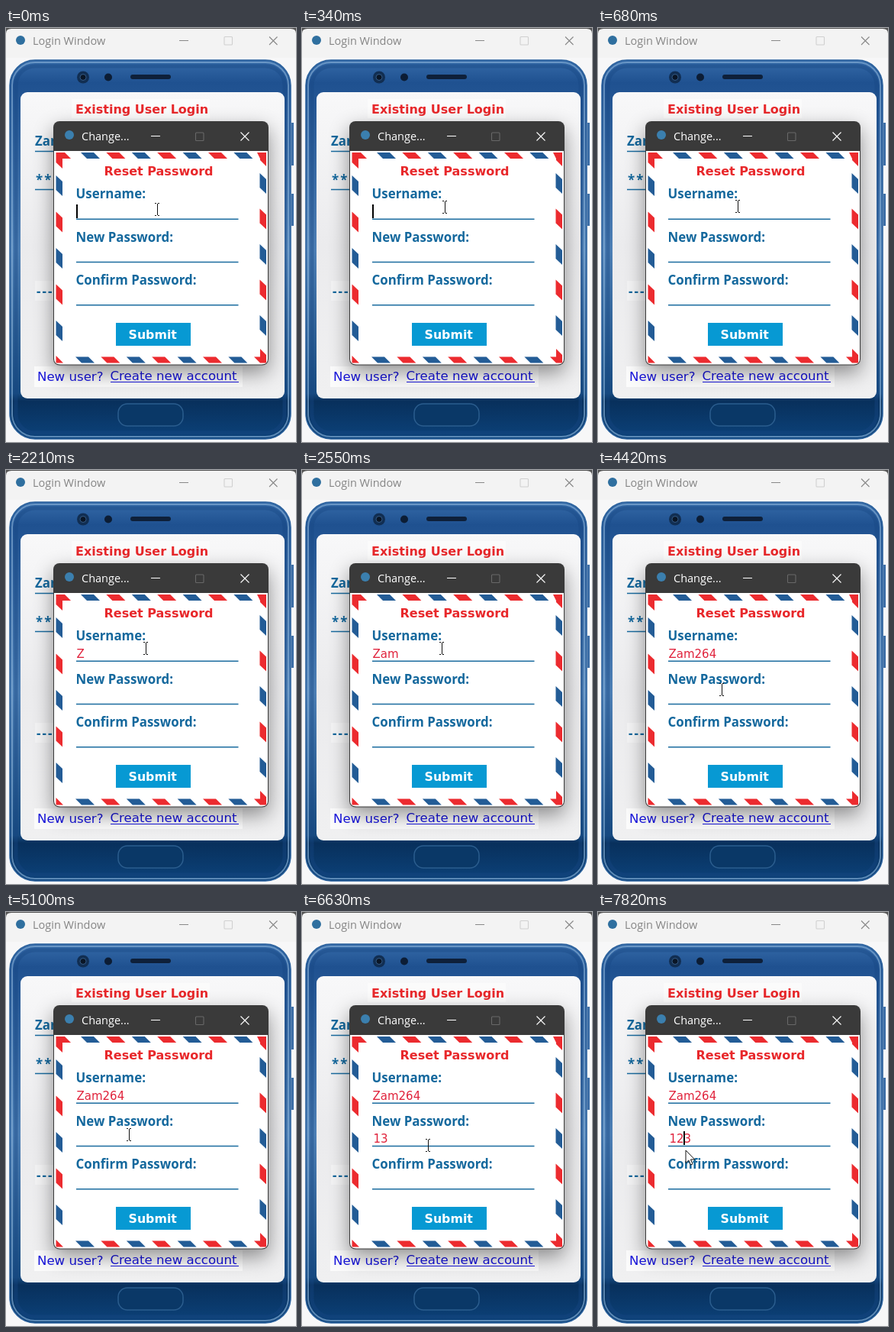
An HTML page that plays this animation: 380 px wide and 542 px high, repeating every 7990 ms.

```html
<!DOCTYPE html>
<html lang="en">
<head>
<meta charset="utf-8">
<title>Reset password form</title>
<style>
  html, body { margin: 0; width: 380px; height: 542px; overflow: hidden; background: #555; }
  svg { display: block; }
  text { white-space: pre; }
  .bar { font: 14.5px "Open Sans", "Noto Sans", sans-serif; }
  .head { font: bold 16px "DejaVu Sans", sans-serif; fill: #e8282b; }
  .label { font: bold 16.9px "Noto Sans", "Open Sans", sans-serif; fill: #14689d; }
  .masked { letter-spacing: 2px; }
  .entry { font: 15px "DejaVu Sans", sans-serif; fill: #e0233c; }
  .button { font: bold 15.8px "DejaVu Sans", sans-serif; fill: #fff; }
  .link { font: 16.6px "DejaVu Sans", sans-serif; fill: #1714dd; }
  .rule { stroke: #1b6c9f; stroke-width: 1.4; }
  .dialog { filter: drop-shadow(0 10px 13px rgba(0, 0, 0, .42)); }
  .crisp { shape-rendering: crispEdges; }
</style>
</head>
<body>
<svg width="380" height="542" viewBox="0 0 380 542">
  <defs>
    <linearGradient id="body" x2="0" y2="1">
      <stop offset="0" stop-color="#356aa8"/>
      <stop offset=".06" stop-color="#1f5190"/>
      <stop offset=".5" stop-color="#4d7fb5"/>
      <stop offset=".88" stop-color="#174a80"/>
      <stop offset=".9" stop-color="#08305c"/>
      <stop offset="1" stop-color="#0c427a"/>
    </linearGradient>
    <linearGradient id="screen" x2="0" y2="1">
      <stop offset="0" stop-color="#f8f8f9"/>
      <stop offset=".5" stop-color="#ebebed"/>
      <stop offset="1" stop-color="#f0f0f1"/>
    </linearGradient>
  </defs>

  <!-- login window -->
  <path d="M0 542V7Q0 1 7 1H373Q380 1 380 7V542Z" fill="#f3f3f3"/>
  <path d="M0 39H380V542H0Z" fill="#f7f7f8"/>
  <circle cx="19" cy="16" r="6" fill="#2f6f9f"/>
  <text class="bar" x="35" y="22" fill="#858585">Login Window</text>
  <g fill="none" stroke="#888" stroke-width="1.1">
    <path class="crisp" d="M227 16.5H239"/>
    <rect x="286" y="11.5" width="10.5" height="10.5" rx="1" stroke="#d0d0d0"/>
    <path d="M345 11.5L355.5 22M355.5 11.5L345 22"/>
  </g>

  <!-- phone -->
  <path d="M374 124h3v56h-3zM374 217h3v42h-3z" fill="#3d6ea6"/>
  <rect x="5" y="42" width="368" height="496" rx="33" fill="url(#body)" stroke="#2d639e" stroke-width="1.5"/>
  <rect x="8" y="45" width="362" height="490" rx="30" fill="none" stroke="#86afd8" stroke-width="2" opacity=".65"/>
  <rect x="13" y="50" width="352" height="480" rx="25" fill="none" stroke="#174783" stroke-width="5" opacity=".4"/>
  <circle cx="101" cy="64.5" r="8" fill="#112e52"/>
  <circle cx="101" cy="64.5" r="4" fill="#0a1626" stroke="#355c88"/>
  <circle cx="134" cy="64.5" r="5" fill="#0c1d35"/>
  <rect x="163" y="61" width="53" height="6" rx="3" fill="#0e203a"/>
  <rect x="19" y="84" width="346" height="401" rx="9" fill="url(#screen)"/>
  <rect x="147" y="492" width="85" height="29" rx="12" fill="#0a3867" stroke="#2b5d8e" stroke-width="1.5"/>

  <path d="M86 93H267V118H86ZM37 443H310V470H37Z" fill="#fbfbfb"/>
  <path d="M38 331H62V357H38Z" fill="#f3f3f4"/>
  <text class="head" x="91" y="112">Existing User Login</text>
  <text class="label" x="38" y="154">Zam</text>
  <text class="label masked" x="39" y="205">*****</text>
  <path class="rule" d="M38 161.5H90M38 211.5H90"/>
  <text class="label masked" x="40" y="351">-----</text>
  <text class="link" x="41" y="462">New user?</text>
  <text class="link" x="136.5" y="461">Create new account</text>
  <path class="crisp" d="M137 463.5H305" stroke="#1714dd"/>

  <!-- reset dialog -->
  <g class="dialog">
    <rect x="62" y="122" width="282" height="319.5" rx="8" fill="#3a3a3a"/>
    <path d="M63 161H343V433Q343 440.5 335 440.5H71Q63 440.5 63 433Z" fill="#fff"/>
  </g>
  <circle cx="83" cy="140" r="6" fill="#3b7fae"/>
  <text class="bar" x="99" y="147" fill="#fff">Change...</text>
  <g fill="none" stroke="#fff" stroke-width="1.1">
    <path class="crisp" d="M190 141.5H202"/>
    <rect x="248.5" y="137" width="10.5" height="10.5" rx="1" stroke="#686868"/>
    <path d="M307.5 136.5L318.5 147.5M318.5 136.5L307.5 147.5"/>
  </g>
  <g fill="#ec2b2f">
    <path d="M65.5 163H77L85 171H74V184L65.5 176Z"/>
    <path d="M329 163H341V181L333 173V171Z"/>
    <path d="M65.5 429L75 438.5H65.5Z"/>
    <path d="M325 430.5H333V420L341 428V438.5H333Z"/>
  </g>
  <g id="stripes"></g>
  <text class="head" x="128.5" y="193">Reset Password</text>
  <text class="label" x="91.5" y="223">Username:</text>
  <text class="label" x="91.5" y="279.5">New Password:</text>
  <text class="label" x="91.5" y="336">Confirm Password:</text>
  <path class="rule" d="M92 250.3H304.5M92 306.5H304.5M92 362.7H304.5"/>
  <rect x="144" y="386" width="98" height="30" fill="#0799d3"/>
  <text class="button" x="160.5" y="407">Submit</text>

  <text class="entry" id="user" x="92.5" y="246"></text>
  <text class="entry" id="pass" x="93.5" y="302"></text>
  <rect class="crisp" id="caret" width="2" height="18"/>
  <g id="pointer">
    <path class="crisp" id="beam" d="M-3 -7.5H-1M1 -7.5H3M0 -7V8M-3 8.5H-1M1 8.5H3" fill="none" stroke="#111"/>
    <path id="arrow" d="M0 0V16.5L3.8 13L6.4 19L9 17.9L6.5 12H11.7Z" fill="#fff" stroke="#111"/>
  </g>
</svg>
<script>
  const LOOP = 7990, TICK = 170;
  const byId = id => document.getElementById(id);
  const clamp = v => Math.min(1, Math.max(0, v));
  const show = (id, on) => byId(id).setAttribute("visibility", on ? "visible" : "hidden");
  const place = (id, x, y) => byId(id).setAttribute("transform", `translate(${x} ${y})`);

  // Airmail border
  const across = (x, y) => `M${x} ${y}h17l8 8h-17z`;
  const down = (x, y) => `M${x} ${y}l8.5 8v19l-8.5 -8z`;
  function stripes(count, shape) {
    for (let i = 0; i < count; i++) {
      byId("stripes").innerHTML += `<path d="${shape(i)}" fill="${i % 2 ? "#ec2b2f" : "#235c96"}"/>`;
    }
  }
  stripes(7, i => across(98 + i * 33.4, 163));
  stripes(7, i => across(91 + i * 33.4, 430.5));
  stripes(5, i => down(65.5, 193 + i * 47.5));
  stripes(5, i => down(332.5, 190 + i * 46.5));

  // Characters appear one by one, the first at the start time
  const typed = (text, t, start, gap) =>
    text.slice(0, Math.max(0, Math.floor((t - start) / gap) + 1));

  const rest = { x: 198, y: 237 };
  const moves = [
    { from: 0, to: 680, x: 183, y: 233 },
    { from: 3910, to: 4590, x: 161, y: 291 },
    { from: 5950, to: 6460, x: 165, y: 305 },
    { from: 6630, to: 6970, x: 115, y: 297 },
    { from: 7480, to: 7820, x: 114.5, y: 311.5 },
  ];
  const ARROW_FROM = 7820;

  function pointerAt(t) {
    let { x, y } = rest;
    for (const move of moves) {
      const left = 1 - clamp((t - move.from) / (move.to - move.from));
      const eased = 1 - left * left;
      x += (move.x - x) * eased;
      y += (move.y - y) * eased;
    }
    return [Math.round(x), Math.round(y)];
  }

  function draw() {
    const t = Math.floor(performance.now() % LOOP / TICK) * TICK;
    const inserted = t >= 7310;

    byId("user").textContent = typed("Zam2", t, 2210, 170) + typed("64", t, 3060, 340);
    byId("pass").textContent = inserted ? "123" : typed("13", t, 5950, 340);

    const blink = t >= 7140 && (t < 7650 || t >= 7820);
    show("caret", t < 510 || (t >= 4760 && t < 5100) || blink);
    place("caret", blink ? (inserted ? 112 : 102) : 92, t < 510 ? 231 : 287);

    place("pointer", ...pointerAt(t));
    show("beam", t < ARROW_FROM);
    show("arrow", t >= ARROW_FROM);
    requestAnimationFrame(draw);
  }
  draw();
</script>
</body>
</html>
```
